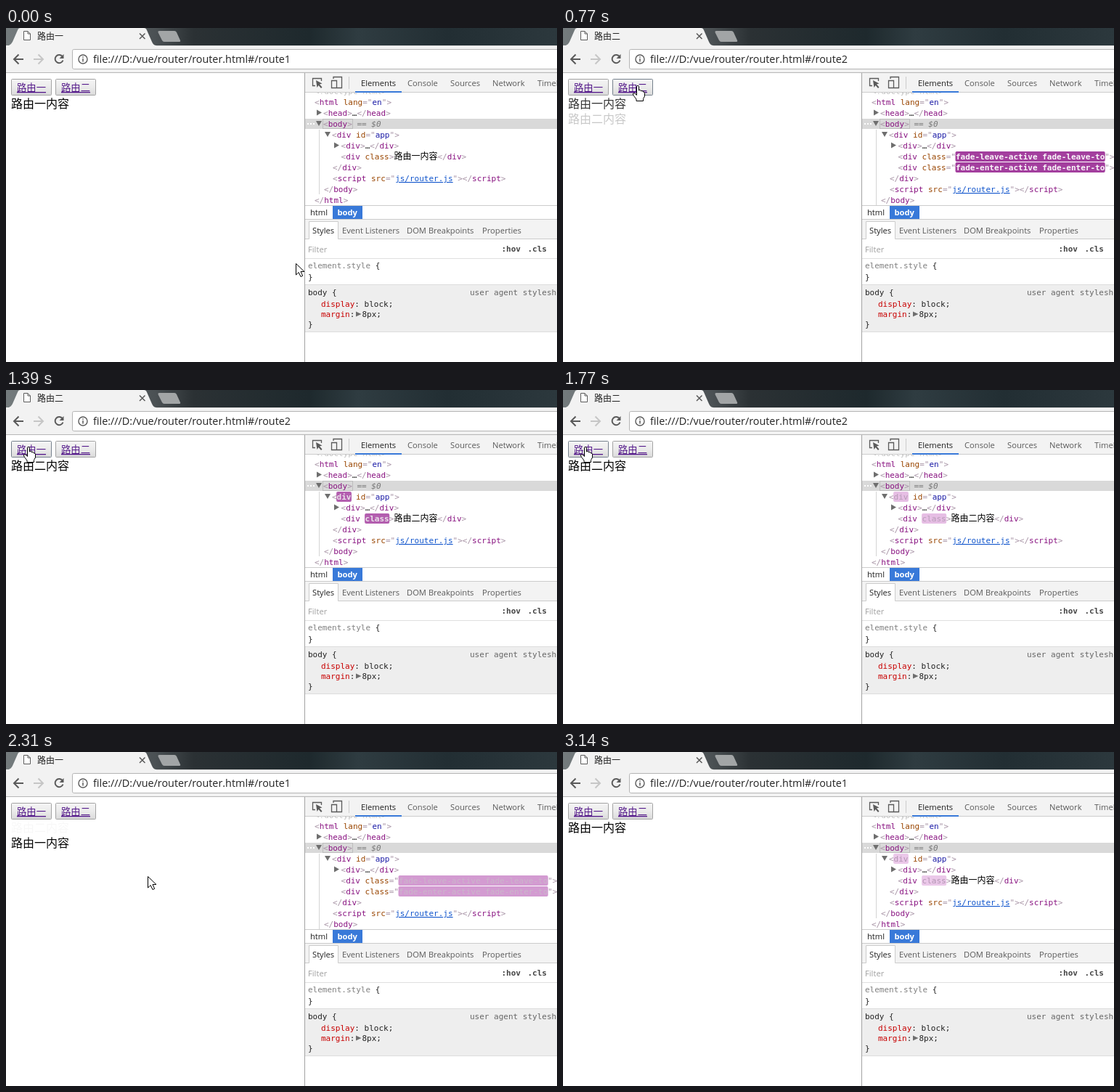
Animation of 759x460 px, one loop 3240 ms. Source, as an HTML page:

```html
<!DOCTYPE html>
<html lang="en">
<head>
<meta charset="utf-8">
<title>Router transition</title>
<style>
html, body { margin: 0; width: 100%; height: 100%; overflow: hidden; background: #fff; }
svg { display: block; width: 759px; height: 460px; }
text { white-space: pre; }
.ui { font: 11.2px "Open Sans", "Noto Sans", sans-serif; fill: #5a5a5a; }
.cjk { font-family: "Noto Sans CJK SC", "Noto Sans CJK", sans-serif; }
.mono { font: 11px "DejaVu Sans Mono", "Noto Sans CJK SC", monospace; fill: #222; }
.b { fill: #a894a6; }
.t { fill: #881280; }
.a { fill: #994500; }
.v { fill: #1a1aa6; }
.l { fill: #1155cc; text-decoration: underline; }
.c { font: 12px "Noto Sans CJK SC", "Noto Sans CJK", sans-serif; fill: #000; }
.p { fill: #c80000; }
.g { fill: #808080; }
</style>
</head>
<body>
<svg viewBox="0 0 759 460">
  <defs>
    <linearGradient id="strip">
      <stop offset="0" stop-color="#747b7d"/>
      <stop offset=".27" stop-color="#4b5154"/>
      <stop offset=".34" stop-color="#2b3134"/>
      <stop offset=".55" stop-color="#1e292d"/>
      <stop offset=".64" stop-color="#2f3c41"/>
      <stop offset=".8" stop-color="#222e33"/>
      <stop offset="1" stop-color="#2c383d"/>
    </linearGradient>
    <linearGradient id="face" x2="0" y2="1">
      <stop offset="0" stop-color="#f5f5f5"/>
      <stop offset=".5" stop-color="#ebebeb"/>
      <stop offset="1" stop-color="#dadada"/>
    </linearGradient>
    <clipPath id="tree"><path d="M412 89H759V244H412z"/></clipPath>
  </defs>
  <rect width="759" height="460" fill="#fff"/>

  <!-- browser frame -->
  <rect width="759" height="25" fill="url(#strip)"/>
  <path d="M0 24H4Q7 23 9 19L16 3Q17 0 20 0H190Q193 0 194 3L201 19Q203 24 207 24H759V61H0z" fill="#f2f2f2"/>
  <path d="M207 24.500H759" stroke="#d8d8d8"/>
  <path d="M211 4H232Q234 4 235 6L240 17Q241 19 238 19H218Q216 19 215 17L209.500 6Q209 4 211 4z" fill="#a2a5a6"/>
  <path d="M24.500 4.500H30L33.500 8V16.500H24.500zM30 4.500V8H33.500" fill="#fff" stroke="#5c5c5c"/>
  <path d="M184 7.500L191.500 15M191.500 7.500L184 15" stroke="#5a5a5a" stroke-width="1.500"/>
  <text id="title" class="cjk" x="43" y="15.500" font-size="12" fill="#222"></text>
  <path d="M0 61.500H759" stroke="#b6b6b6"/>
  <path d="M760 29.500H93.500Q91.500 29.500 91.500 31.500V54Q91.500 56.500 93.500 56.500H760" fill="#fff" stroke="#b4b4b4"/>
  <g fill="none" stroke-width="2">
    <path d="M24 43H11.500M17.500 36.500L11 43L17.500 49.500" stroke="#5a5a5a"/>
    <path d="M38 43H50.500M44.500 36.500L51 43L44.500 49.500" stroke="#c6c6c6"/>
    <path d="M77.500 39A5.600 5.600 0 1 0 78.500 44.500" stroke="#5a5a5a"/>
    <circle cx="106" cy="43" r="6" stroke="#5a5a5a" stroke-width="1.400"/>
    <path d="M106 42V46.500M106 39.200V40.800" stroke="#5a5a5a" stroke-width="1.500"/>
  </g>
  <path d="M79.500 36V42H73.500z" fill="#5a5a5a"/>
  <text id="url" x="120" y="48" fill="#222" style="font:14.380px 'Open Sans','Noto Sans',sans-serif"></text>

  <g id="page"></g>

  <!-- inspector -->
  <rect x="412" y="62" width="347" height="27" fill="#f3f3f3"/>
  <path d="M412 88.500H759" stroke="#ccc"/>
  <path d="M481 87H545V89H481z" fill="#3879d9"/>
  <path d="M472.500 67V84" stroke="#ccc"/>
  <g fill="none" stroke="#5a5a5a" stroke-width="1.300">
    <path d="M426 79.500H422.500V69.500H434.500V73"/>
    <path d="M451 70V67.500H462.500V82.500H456M448.500 72.500H455.500V82.500H448.500z"/>
  </g>
  <path d="M427 72L435.500 76.500L432 77.500L435.500 81.500L434 83L430.500 79L428.500 82z" fill="#5a5a5a"/>
  <g id="dom" clip-path="url(#tree)"></g>
  <path d="M412 244.500H759M412 263.500H759" stroke="#ccc"/>
  <rect x="450" y="245" width="41" height="18" fill="#3879d9"/>
  <rect x="412" y="264" width="347" height="27" fill="#f3f3f3"/>
  <path d="M412 290.500H417.500V266.500H457.500V290.500H759" fill="none" stroke="#ccc"/>
  <path d="M418 267H457V291H418z" fill="#fff"/>
  <path d="M412 317.500H759" stroke="#e0e0e0"/>
  <rect x="412" y="354" width="347" height="65" fill="#eee"/>
  <path d="M412 353.500H759M412 418.500H759" stroke="#ddd"/>
  <path d="M482 390.500L489.500 394L482 397.500z" fill="#6e6e6e"/>
  <g id="labels"></g>
  <path d="M411.500 62V460" stroke="#a3a3a3"/>
  <g id="cursor" stroke="#000" fill="#fff" stroke-linejoin="round">
    <path id="arrow" d="M.5 .5V16L4.200 12.500L7 18.500L9.700 17.300L7 11.500H12z"/>
    <path id="hand" d="M-1.500 11V1.500Q-1.500 .5 0 .5T1.500 1.500V7Q2 6 3.300 6.500T4.500 8Q5 7 6.200 7.500T7.300 9Q9.300 8.500 9.500 10.500V15L7.500 18.500V21.500H-2V19L-5.500 14.500Q-7.500 11.500 -6 10.800T-3 12L-1.500 13.500z"/>
  </g>
</svg>
<script>
const LOOP = 3240, STEP = 77.1;
const CLICKS = [690, 1917], FADE = 500, FLASH = 1120;
const $ = id => document.getElementById(id);
const names = ['路由一', '路由二'];
const path = [[0, 399, 324], [463, 103, 79], [925, 103, 79], [1080, 57, 81],
  [1234, 31, 78], [2235, 31, 78], [2544, 679, 446], [2600, 800, 520]];
const buttons = [7, 68];

const clamp = v => Math.max(0, Math.min(1, v));
const mix = (a, b, k) => a.map((v, i) => Math.round(v + (b[i] - v) * k));
const rgb = c => `rgb(${c})`;
const esc = s => s.replace(/</g, '&lt;').replace(/>/g, '&gt;');
const text = (x, y, s, cls, more = '') => `<text x="${x}" y="${y}" class="${cls}" ${more}>${s}</text>`;
const span = (cls, s) => `<tspan class="${cls}">${esc(s)}</tspan>`;

// cubic-bezier(.25, .1, .25, 1)
function ease(x) {
  if (x <= 0 || x >= 1) return clamp(x);
  const curve = (a, b, u) => 3 * a * u * (1 - u) ** 2 + 3 * b * u * u * (1 - u) + u ** 3;
  let lo = 0, hi = 1;
  for (let i = 0; i < 24; i++) {
    const mid = (lo + hi) / 2;
    if (curve(.25, .25, mid) < x) lo = mid; else hi = mid;
  }
  return curve(.1, 1, lo);
}

function pointer(t) {
  const i = path.findIndex(p => p[0] > t);
  if (i < 0) return path[path.length - 1].slice(1);
  const [a, b] = [path[i - 1], path[i]];
  return mix(a.slice(1), b.slice(1), (t - a[0]) / (b[0] - a[0]));
}

const open = (name, attr = '') => span('b', '<') + span('t', name) + attr + span('b', '>');
const close = name => span('b', '</') + span('t', name) + span('b', '>');
const attr = (name, value, cls = 'v') =>
  span('a', ' ' + name) + span('b', '="') + span(cls, value) + span('b', '"');

function flash(x, y, chars, s, age) {
  const k = ease(age / FLASH);
  const back = mix([158, 54, 153], [245, 219, 244], k);
  const ink = mix([255, 255, 255], [168, 135, 168], k);
  return `<rect x="${x - .5}" y="${y - 11}" width="${chars * 6.62 + 1}" height="14" rx="2" fill="${rgb(back)}"/>` +
    text(x, y, s, 'mono', `style="fill:${rgb(ink)};font-weight:${k < .5 ? 700 : 400}"`);
}

function tree(route, moving, age) {
  let out = '', y = 91;
  const row = (x, s) => { out += text(x, y, s, 'mono'); y += 15; };
  const down = x => `<path d="M${x} ${y - 8}h8l-4 7z" fill="#6e6e6e"/>`;
  const right = x => `<path d="M${x} ${y - 8.5}v8l7-4z" fill="#6e6e6e"/>`;
  row(425, `<tspan fill="#c0c0c0">${esc('<!doctype html>')}</tspan>`);
  row(425, open('html', attr('lang', 'en')));
  out += right(428);
  row(437, open('head') + '…' + close('head'));
  out += '<rect x="412" y="125" width="347" height="14" fill="#d9d9d9"/>' +
    '<path d="M415 132h2m2 0h2m2 0h2" stroke="#fff" stroke-width="2"/>' +
    '<rect x="436.500" y="125.500" width="41" height="13" fill="none" stroke="#a0a0a0" stroke-dasharray="1 1"/>' +
    `<path d="M431.500 140V${moving ? 244 : 229}" stroke="#d4d4d4"/>` + down(427);
  out += text(483.5, y, '== $0', 'mono', 'style="fill:#777;font-style:italic"');
  row(437, open('body'));
  out += down(439);
  row(449, open('div', attr('id', 'app')));
  if (!moving && age >= 0) out += flash(455.6, y - 15, 3, 'div', age);
  out += right(452);
  row(461.5, open('div') + '…' + close('div'));
  if (moving) {
    for (const kind of ['leave', 'enter']) {
      const cls = `fade-${kind}-active fade-${kind}-to`;
      out += flash(541, y, cls.length, cls, age);
      out += text(746.2, y, span('b', '">'), 'mono');
      row(461.5, span('b', '<') + span('t', 'div') + span('a', ' class') + span('b', '="'));
    }
  } else {
    row(461.5, open('div', span('a', ' class')) + span('c', names[route] + '内容') + close('div'));
    if (age >= 0) out += flash(494.6, y - 15, 5, 'class', age);
  }
  row(450, close('div'));
  row(450, open('script', attr('src', 'js/router.js', 'l')) + close('script'));
  row(438, close('body'));
  row(425, close('html'));
  return out;
}

function page(route, moving, k, hover, pressed) {
  const line = (r, y, o) => text(7, y, names[r] + '内容', 'cjk', `font-size="16" opacity="${o}"`);
  let out = '';
  buttons.forEach((x, i) => {
    const on = hover === i;
    out += `<rect x="${x + .5}" y="70.500" width="55" height="22" rx="1" fill="${on && pressed ? '#e2e2e2' : 'url(#face)'}" stroke="${on ? '#75808c' : '#a3a3a3'}"/>` +
      text(x + 8, 87, names[i], 'cjk', 'font-size="13.333" fill="#551a8b" text-decoration="underline"');
  });
  return out + (moving ? line(1 - route, 110, 1 - k) + line(route, 131, k) : line(route, 110, 1));
}

function labels() {
  const ui = (x, y, s, more) => text(x, y, s, 'ui', more);
  const code = (x, y, s, more) => text(x, y, s, 'mono', more);
  return ui(489, 80, 'Elements', 'style="fill:#222"') + ui(553, 80, 'Console') + ui(612, 80, 'Sources') +
    ui(670, 80, 'Network') + ui(732, 80, 'Timeline') + ui(419, 258, 'html', 'style="fill:#222"') +
    ui(456.5, 258, 'body', 'style="fill:#fff;font-weight:700"') + ui(422, 283, 'Styles', 'style="fill:#222"') +
    ui(463, 283, 'Event Listeners') + ui(552, 283, 'DOM Breakpoints') + ui(656, 283, 'Properties') +
    ui(416, 309, 'Filter', 'style="fill:#a0a0a0"') +
    code(682.5, 308, ':hov', 'style="fill:#444;font-weight:700"') + code(718.5, 308, '.cls', 'style="fill:#444;font-weight:700"') +
    code(416, 331, span('g', 'element.style') + ' {') + code(416, 347, '}') +
    code(416, 368, 'body {') + code(639, 368, 'user agent stylesheet', 'style="fill:#666"') +
    code(434, 384, span('p', 'display') + ': block;') + code(434, 398, span('p', 'margin') + ':') +
    code(490.5, 398, '8px;') + code(416, 412, '}');
}

function draw(now) {
  // the screen refreshes in even steps
  const t = Math.floor((now % LOOP + 13) / STEP) * STEP;
  const last = CLICKS.filter(c => t >= c).length - 1;
  const since = last < 0 ? -1 : t - CLICKS[last];
  const route = last === 0 ? 1 : 0;
  const moving = since >= 0 && since < FADE;
  const age = since < FADE && !moving ? -1 : moving ? since : since - FADE;
  const [x, y] = pointer(t);
  const hover = y >= 70 && y < 93 ? buttons.findIndex(b => x >= b && x < b + 56) : -1;
  const pressed = CLICKS.some(c => t >= c - 75 && t < c);

  $('title').textContent = names[route];
  $('url').textContent = 'file:///D:/vue/router/router.html#/route' + (route + 1);
  $('page').innerHTML = page(route, moving, ease(since / FADE), hover, pressed);
  $('dom').innerHTML = tree(route, moving, age);
  $('cursor').setAttribute('transform', `translate(${x} ${y})`);
  $('arrow').style.display = hover < 0 ? '' : 'none';
  $('hand').style.display = hover < 0 ? 'none' : '';
}

$('labels').innerHTML = labels();
const start = performance.now();
function tick() {
  draw(performance.now() - start);
  requestAnimationFrame(tick);
}
tick();
</script>
</body>
</html>
```
